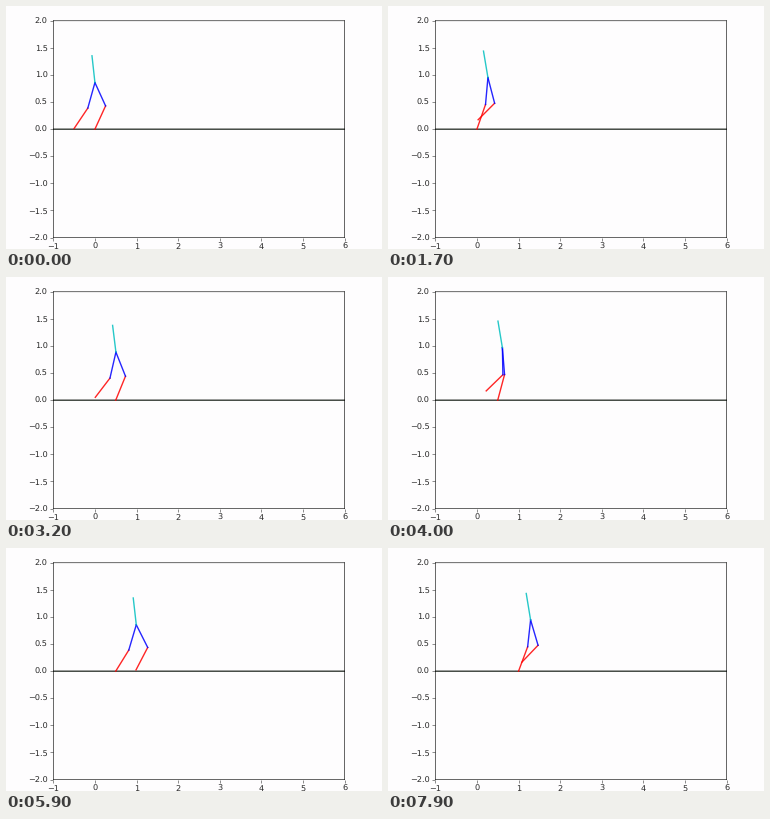
A matplotlib script for the animation above (8000 ms loop, 376 by 243 pixels).

```python
import numpy as np
import matplotlib.pyplot as plt
from matplotlib.animation import FuncAnimation

FRAMES, INTERVAL = 80, 100
STEP = 30.4            # frames per step
LEAD = 0.4             # how far the first step has begun at the start
STRIDE = 0.5           # distance covered by one step
LINK = 0.5             # length of thigh, shin and torso
EASE_IN, EASE_OUT = 9.2, 3.2
PAPER = "#fefdfe"

plt.rcParams.update({
    "font.family": "DejaVu Sans",
    "text.hinting": "no_hinting",
    "xtick.color": "#555555", "ytick.color": "#555555",
    "xtick.labelcolor": "#2b2b2b", "ytick.labelcolor": "#2b2b2b",
})

# Plot box edges in pixels, measured from the top left corner.
W, H = 376, 243
LEFT, RIGHT, TOP, BOTTOM = 47.29, 338.69, 14.78, 231.57

fig = plt.figure(figsize=(6.4, 4.1362), dpi=58.75, facecolor=PAPER)
ax = fig.add_axes([LEFT / W, 1 - BOTTOM / H,
                   (RIGHT - LEFT) / W, (BOTTOM - TOP) / H], facecolor=PAPER)
ax.set_xlim(-1, 6)
ax.set_ylim(-2, 2)
for spine in ax.spines.values():
    spine.set(linewidth=0.72, snap=False)

ax.plot([-1, 6], [0, 0], color="#101810", lw=1.44, snap=False)


def limb(color):
    return ax.plot([], [], color=color, lw=1.7, alpha=0.85, snap=False)[0]


shins = [limb("r"), limb("r")]
thighs = [limb("b"), limb("b")]
torso = limb("c")


def travel(p):
    """Progress 0..1 through a step: speed up, cruise, slow down."""
    speed = 1 / (STEP - (EASE_IN + EASE_OUT) / 2)
    if p < EASE_IN:
        return speed * p * p / (2 * EASE_IN)
    if p > STEP - EASE_OUT:
        return 1 - speed * (STEP - p) ** 2 / (2 * EASE_OUT)
    return speed * (p - EASE_IN / 2)


def knee_of(foot, hip):
    """Forward-bending knee joint of a two-link leg."""
    d = hip - foot
    length = np.hypot(*d)
    bend = np.sqrt(max(LINK ** 2 - length ** 2 / 4, 0))
    return (foot + hip) / 2 + bend * np.array([d[1], -d[0]]) / length


def pose(frame):
    step, p = divmod(frame + LEAD, STEP)
    s = travel(p)
    arc = np.sin(np.pi * (p / STEP) ** 0.88)

    stance = np.array([step * STRIDE, 0.0])
    swing = stance + [(2 * s - 1) * STRIDE, 0.185 * arc]

    # The stance leg straightens early, then carries the hip over the foot.
    reach = 0.852 + 0.136 * (1 - max(1 - p / 13.5, 0) ** 1.8)
    shift = s * STRIDE
    hip = stance + [shift, np.sqrt(reach ** 2 - shift ** 2)]

    lean = np.radians(7.8 + 4.8 * arc)
    head = hip + LINK * np.array([-np.sin(lean), np.cos(lean)])
    return hip, head, (stance, swing)


def join(line, a, b):
    line.set_data([a[0], b[0]], [a[1], b[1]])


def update(frame):
    hip, head, feet = pose(frame)
    for foot, shin, thigh in zip(feet, shins, thighs):
        knee = knee_of(foot, hip)
        join(shin, foot, knee)
        join(thigh, knee, hip)
    join(torso, hip, head)
    return [*shins, *thighs, torso]


anim = FuncAnimation(fig, update, frames=FRAMES, interval=INTERVAL,
                     repeat=True, repeat_delay=0, blit=False)
plt.show()
```
